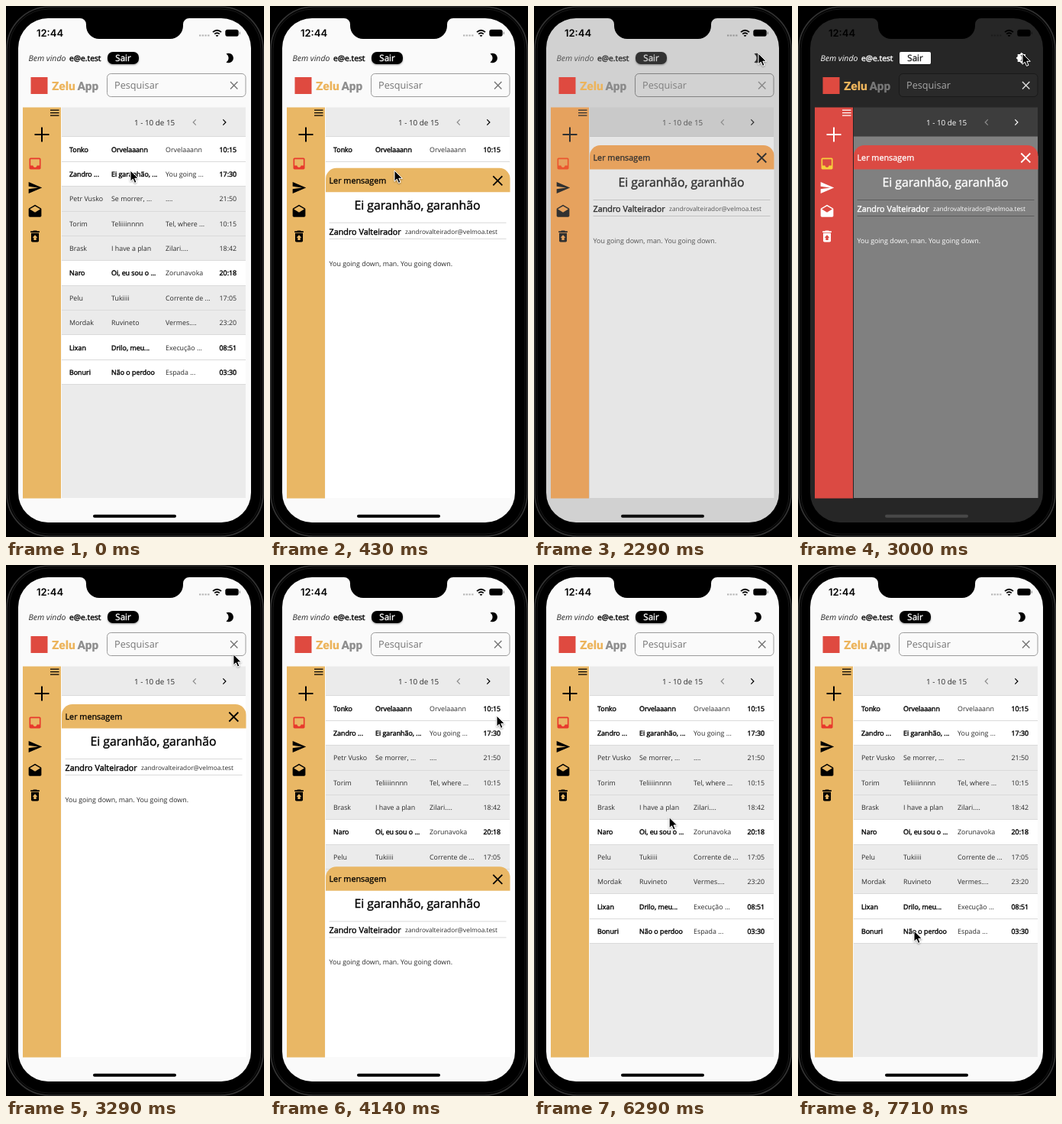
These frames come from a looping animation (338x694 px, 8000 ms). An HTML page:

```html
<!DOCTYPE html>
<html lang="pt">
<head>
<meta charset="utf-8">
<title>Correio</title>
<style>
html, body { margin: 0; width: 100%; height: 100%; overflow: hidden; background: #000; }
svg { display: block; width: 338px; height: 694px; }
text { font-family: "Open Sans", sans-serif; font-size: 8.9px; fill: var(--text); text-rendering: geometricPrecision; white-space: pre; }
.b { stroke: var(--ink); stroke-width: .4px; fill: var(--ink); }
.ink { fill: var(--ink); }
.line { fill: none; stroke: var(--ink); }
.accent { fill: var(--accent); }
.bar { fill: var(--bar); }
.paper { fill: var(--paper); }
.rule { stroke: var(--rule); }
</style>
</head>
<body>
<svg viewBox="0 0 338 694">
  <defs>
    <clipPath id="screen"><rect x="16" y="16" width="305" height="659" rx="39"/></clipPath>
    <clipPath id="main"><rect x="72.5" y="171" width="242.5" height="472"/></clipPath>
    <filter id="soft" x="-50%" y="-50%" width="200%" height="200%">
      <feDropShadow dx="0" dy="1" stdDeviation=".9" flood-opacity=".4"/>
    </filter>
  </defs>

  <!-- phone -->
  <rect width="338" height="694"/>
  <rect x="1" y="1" width="336" height="692" rx="56" fill="#050505" stroke="#343434" stroke-width="1.6"/>
  <rect x="4" y="4" width="330" height="686" rx="52" fill="#000" stroke="#171717"/>

  <g clip-path="url(#screen)">
    <rect x="16" y="16" width="305" height="659" style="fill:var(--page)"/>

    <!-- status bar -->
    <path d="M97 15v1a8 8 0 0 1 8 8v2a17 17 0 0 0 17 17h93a17 17 0 0 0 17-17v-2a8 8 0 0 1 8-8v-1z"/>
    <text x="40" y="40" style="font:600 13px Inter,sans-serif;fill:#000">12:44</text>
    <path d="M253 38.5h14" stroke="#000" stroke-opacity=".28" stroke-width="2.2" stroke-dasharray="2.4 1.3"/>
    <g fill="none" stroke="#000" stroke-width="1.8">
      <path d="M271 34.2q5.5-5 11 0M273.2 36.7q3.3-3 6.6 0"/>
      <path d="M276.5 40l-1.3-1.5h2.6z" stroke-width="1"/>
    </g>
    <rect x="287.5" y="31" width="17" height="8.5" rx="2.6" stroke="#000" stroke-opacity=".4"/>
    <path d="M306.3 33.7v3.2" stroke="#000" stroke-opacity=".4" stroke-width="1.2"/>

    <!-- greeting -->
    <text x="29.5" y="72" font-style="italic" style="font-size:10.5px">Bem vindo</text>
    <text x="83" y="72" class="b" style="font-size:10.3px">e@e.test</text>
    <rect id="exit" x="133" y="60" width="41" height="16" class="ink" filter="url(#soft)"/>
    <text x="153.5" y="72.3" text-anchor="middle" style="font-size:11.5px;fill:var(--page);stroke:var(--page);stroke-width:.4px">Sair</text>
    <path id="moon" class="ink" transform="translate(285.2 60.4) scale(.635)" d="M10 2c-1.82 0-3.53.5-5 1.35C7.99 5.08 10 8.3 10 12s-2.01 6.92-5 8.65C6.47 21.5 8.18 22 10 22c5.52 0 10-4.48 10-10S15.52 2 10 2z"/>
    <path id="sun" class="ink" transform="translate(285.2 60.4) scale(.635)" d="M20 8.69V4h-4.69L12 .69 8.69 4H4v4.69L.69 12 4 15.31V20h4.69L12 23.31 15.31 20H20v-4.69L23.31 12zM12 18c-.89 0-1.74-.2-2.5-.55C11.56 16.5 13 14.42 13 12s-1.44-4.5-3.5-5.45C10.26 6.2 11.11 6 12 6c3.31 0 6 2.69 6 6s-2.69 6-6 6z"/>

    <!-- brand and search -->
    <rect x="32.5" y="93" width="22" height="22" fill="#df4a40"/>
    <g style="--f:800 15.5px Roboto,sans-serif">
      <text x="60" y="109.5" style="font:var(--f);fill:#ecb45c">Zelu</text>
      <text x="93.5" y="109.5" style="font:var(--f);fill:var(--brand)">App</text>
    </g>
    <rect x="132.5" y="88.5" width="181.5" height="30" rx="5" style="fill:var(--field);stroke:var(--edge)"/>
    <text x="142" y="107.5" style="font-size:12.7px;fill:var(--hint)">Pesquisar</text>
    <path d="M294 99l9.4 9.4m0-9.4l-9.4 9.4" fill="none" stroke-width="1.4" style="stroke:var(--clear)"/>

    <!-- sidebar -->
    <rect x="22" y="132.5" width="50" height="511" class="accent"/>
    <path class="line" d="M58 136.2h11.5M58 139.7h11.5M58 143.2h11.5" stroke-width="1.3"/>
    <path class="line" d="M37.5 168h19M47 158.5v19" stroke-width="2"/>
    <g class="ink">
      <path style="fill:var(--active)" transform="translate(28 196) scale(.835)" d="M19 3H5c-1.11 0-2 .89-2 2v14c0 1.1.88 2 2 2h14c1.1 0 2-.9 2-2V5c0-1.11-.9-2-2-2zm0 12h-4c0 1.66-1.35 3-3 3s-3-1.34-3-3H5V5h14v10z"/>
      <path transform="translate(28 227.5) scale(.835)" d="M2 21L23 12 2 3v7l15 2-15 2z"/>
      <path transform="translate(28 259) scale(.835)" d="M22 8c0-.72-.37-1.35-.94-1.7L12 1 2.95 6.3C2.38 6.65 2 7.28 2 8v10c0 1.1.9 2 2 2h16c1.1 0 2-.9 2-2zM12 13L3.74 7.84 12 3l8.26 4.84z"/>
      <path transform="translate(28 291) scale(.835)" d="M19 4h-3.5l-1-1h-5l-1 1H5v2h14zM6 7v12c0 1.1.9 2 2 2h8c1.1 0 2-.9 2-2V7zm8 7v4h-4v-4H8l4-4 4 4z"/>
    </g>

    <!-- list -->
    <rect x="73" y="132.5" width="241" height="510.5" class="bar"/>
    <text x="168" y="155.5" style="font-size:9.9px">1 - 10 de 15</text>
    <g fill="none" stroke-width="1.2">
      <path d="M248.8 148.4l-3.6 3.6 3.6 3.6" stroke="#8c8c8c"/>
      <path class="line" d="M284.3 148.4l3.6 3.6-3.6 3.6"/>
    </g>
    <g id="rows"></g>
    <path class="rule" d="M73 170.5h241"/>

    <!-- message -->
    <g clip-path="url(#main)">
      <g id="panel">
        <rect x="73" y="196" width="241.5" height="447" class="paper"/>
        <path class="accent" d="M73 213.5V196a14 14 0 0 1 14-14h213.5a14 14 0 0 1 14 14v17.5z"/>
        <text x="77.5" y="202" class="b" style="font-size:10.8px;stroke-width:.3px">Ler mensagem</text>
        <path class="line" d="M292.3 192.5l12 12m0-12l-12 12" stroke-width="1.8"/>
        <text x="193" y="236" text-anchor="middle" class="b" style="font-size:15.8px">Ei garanhão, garanhão</text>
        <path class="rule" d="M77.5 253.5h232M77.5 274.5h232"/>
        <text x="77.5" y="268.7" class="b" style="font-size:10.8px">Zandro Valteirador</text>
        <text x="177" y="267.7" style="font-size:8.3px">zandrovalteirador@velmoa.test</text>
        <text x="77.5" y="310">You going down, man. You going down.</text>
      </g>
    </g>
    <rect x="114" y="664.7" width="109" height="4" rx="2" style="fill:var(--home)"/>
  </g>

  <path id="cursor" d="M0 0V14.2L3.3 11.2 5.5 16.4 8 15.3 5.8 10.3H10.3Z" stroke="#fff" stroke-width="1" filter="url(#soft)"/>
</svg>
<script>
const $ = id => document.getElementById(id);
const LOOP = 8000, FPS = 7;

// Leading "*" marks an unread message.
const mails = [
  '*Tonko|Orvelaaann|Orvelaaann|10:15',
  '*Zandro ...|Ei garanhão, ...|You going ...|17:30',
  'Petr Vusko|Se morrer, ...|....|21:50',
  'Torim|Teliiiinnnn|Tel, where ...|10:15',
  'Brask|I have a plan|Zilari....|18:42',
  '*Naro|Oi, eu sou o ...|Zorunavoka|20:18',
  'Pelu|Tukiiii|Corrente de ...|17:05',
  'Mordak|Ruvineto|Vermes....|23:20',
  '*Lixan|Drilo, meu...|Execução ...|08:51',
  '*Bonuri|Não o perdoo|Espada ...|03:30'
];
const cols = [83, 138, 209, 279.5], rowH = 32.35;

$('rows').innerHTML = mails.map((mail, i) => {
  const unread = mail[0] === '*';
  const y = 171 + i * rowH, top = Math.floor(y), bottom = Math.floor(y + rowH);
  const cells = mail.replace('*', '').split('|').map((s, c) =>
    `<text x="${cols[c]}" y="${y + 19.7}" class="${unread && c !== 2 ? 'b' : ''}">${s}</text>`);
  return `<rect x="73" y="${top}" width="241" height="${bottom - top}" class="${unread ? 'paper' : 'bar'}"/>` +
    cells.join('') + `<path class="rule" d="M73 ${bottom + .5}h241"/>`;
}).join('');
// Paint separators above the neighbouring row fills.
$('rows').append(...$('rows').querySelectorAll('.rule'));

// name: [light, dark]
const theme = {
  page: ['#fafafa', '#262626'], ink: ['#000', '#fff'], text: ['#2b2b2b', '#fff'],
  accent: ['#e9b765', '#db4a43'], active: ['#e8392c', '#f6cf3c'],
  bar: ['#ebebeb', '#3d3d3d'], paper: ['#fff', '#808080'], rule: ['#dadada', '#5c5c5c'],
  field: ['#fafafa', '#2a2a2a'], edge: ['#9b9b9b', '#191919'], hint: ['#757575', '#a8a8a8'],
  clear: ['#757575', '#dedede'], brand: ['#8f8f8f', '#777'], home: ['#000', '#484848']
};

// time, x, y
const path = [
  [0, 163, 215], [860, 163, 215], [1140, 185, 185], [1710, 270, 90], [2000, 294, 62],
  [3000, 294, 62], [3140, 295, 70], [3290, 298, 118], [3430, 298, 150], [3710, 297, 185],
  [4000, 297, 197], [4860, 297, 197], [5000, 268, 208], [5140, 230, 235], [5290, 210, 250],
  [5430, 210, 250], [6000, 190, 310], [6290, 177, 330], [6430, 177, 330],
  [7000, 163, 400], [7570, 151, 469], [7710, 152, 478], [LOOP, 152, 478]
];

const ramp = (t, from, to) => Math.min(1, Math.max(0, (t - from) / (to - from)));
const easeOut = p => 1 - (1 - p) ** 2.2;

function cursorAt(t) {
  const i = Math.max(1, path.findIndex(k => k[0] >= t));
  const [a, b] = [path[i - 1], path[i]], p = ramp(t, a[0], b[0]);
  return [1, 2].map(n => a[n] + (b[n] - a[n]) * p);
}

function draw(t) {
  const dark = ramp(t, 2220, 2560) - ramp(t, 3010, 3280);
  const open = easeOut(ramp(t, 101, 561)) - easeOut(ramp(t, 4050, 4430));
  for (const [name, [light, night]] of Object.entries(theme))
    document.body.style.setProperty('--' + name, `color-mix(in srgb, ${night} ${dark * 100}%, ${light})`);
  const night = dark > .5;
  $('moon').style.display = night ? 'none' : '';
  $('sun').style.display = night ? '' : 'none';
  $('exit').setAttribute('rx', night ? 2 : 7);
  $('panel').setAttribute('transform', `translate(0 ${461.5 * (1 - open)})`);
  $('panel').style.display = open > 0 ? '' : 'none';
  $('cursor').setAttribute('transform', `translate(${cursorAt(t)})`);
}

const start = performance.now();
function tick() {
  const t = (performance.now() - start) % LOOP;
  draw(Math.floor((t + 5) * FPS / 1000) * 1000 / FPS);
  requestAnimationFrame(tick);
}
tick();
</script>
</body>
</html>
```
